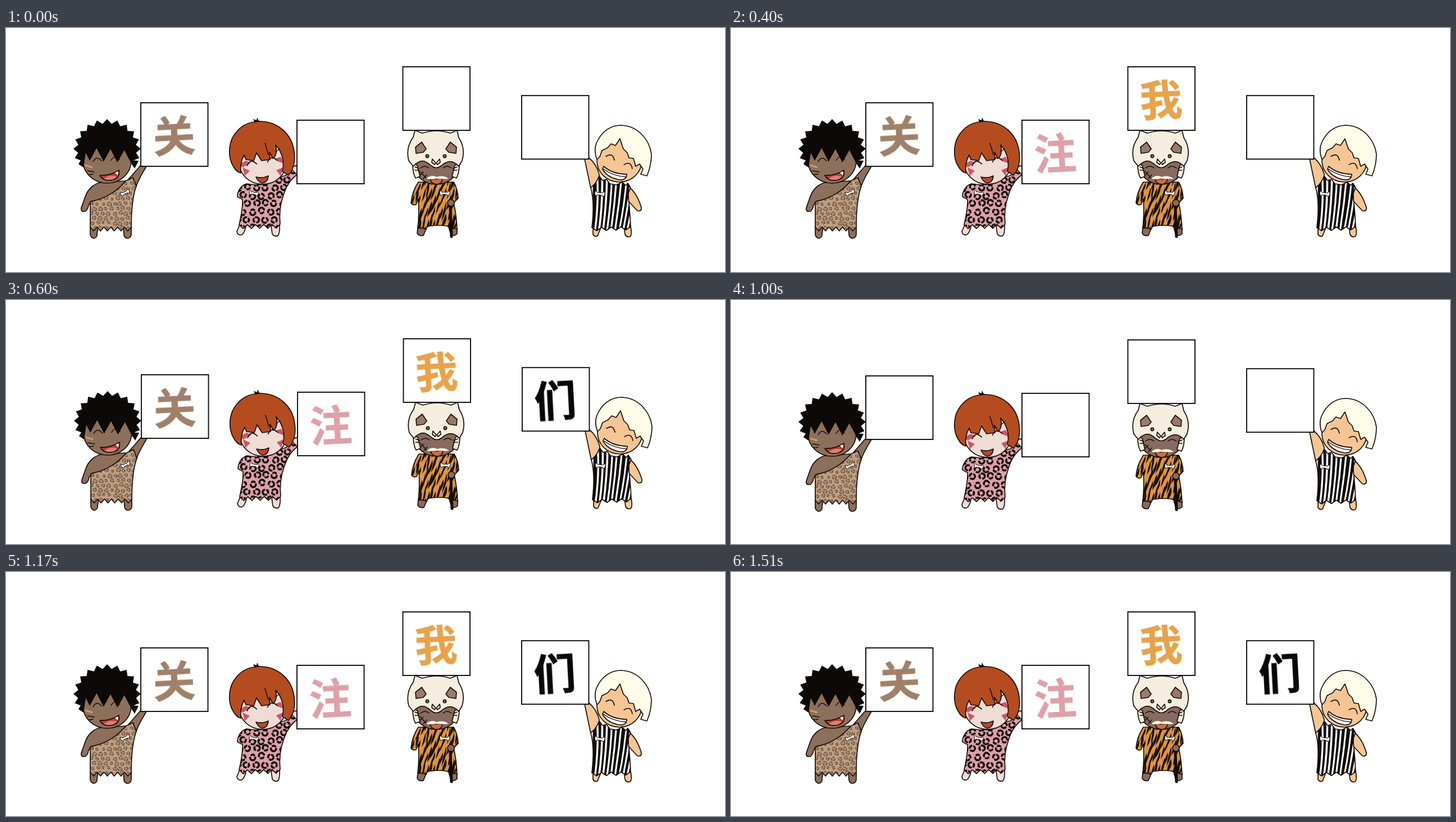
Write an HTML page that moves like this. It is 1280 px wide and 434 px high and loops after 1680 ms.

```html
<!DOCTYPE html>
<html lang="zh-CN">
<head>
<meta charset="utf-8">
<title>关注我们</title>
<style>
html, body { margin: 0; width: 100%; height: 100%; overflow: hidden; background: #fff; }
svg { display: block; width: 100%; height: 100%; }
.line { stroke: #1a0d08; stroke-width: 1.7; stroke-linejoin: round; stroke-linecap: round; }
.thin { fill: none; stroke: #1a0d08; stroke-width: 1.5; stroke-linecap: round; stroke-linejoin: round; }
.card { fill: #fff; stroke: #0c0c0c; stroke-width: 1.9; }
.sign {
  font: 700 75px "Noto Sans CJK SC", "Noto Sans CJK", sans-serif;
  text-anchor: middle; stroke-width: .8; stroke-linejoin: round;
  animation: 1680ms step-end infinite;
}
#stage { animation: drift 1680ms step-end infinite; }
#words { animation: blink 1680ms step-end infinite; }
@keyframes drift {
  0% { transform: translate(0, 0); }
  35.7143% { transform: translate(1px, 0); }
  47.619% { transform: translate(1px, 1px); }
  59.5238%, 100% { transform: translate(0, 2px); }
}
@keyframes blink {
  0%, 69.6429%, 89.881%, 100% { opacity: 1; }
  59.5238%, 79.7619% { opacity: 0; }
}
@keyframes second { 0% { opacity: 0; } 11.9048%, 100% { opacity: 1; } }
@keyframes third { 0% { opacity: 0; } 23.8095%, 100% { opacity: 1; } }
@keyframes fourth { 0% { opacity: 0; } 35.7143%, 100% { opacity: 1; } }
</style>
</head>
<body>
<svg viewBox="0 0 1280 434">
<defs>
  <g id="bone" fill="none" stroke-linecap="round">
    <path d="M-7-2L-6 2M7-2L6 2M-7 0H7" stroke="#1a0d08" stroke-width="5"/>
    <path d="M-7-2L-6 2M7-2L6 2M-7 0H7" stroke="#fff" stroke-width="3"/>
  </g>
  <g id="flap">
    <path class="line" fill="#f5eee0" d="M724 242Q724 258 729 267L737 264L732 244Z"/>
  </g>
  <g id="half" class="line" fill="#9a7b6b">
    <path d="M740 203L748 215L743 221L730 223L729 212Z"/>
    <circle cx="750" cy="228" r="2.6"/>
    <path fill="#f5eee0" d="M759 233L765 240L763 243L758 239Z"/>
    <path class="thin" d="M738 249Q746 243 753 249M728 247L735 250M728 253L735 253"/>
  </g>
  <path id="eyes" class="thin" d="M-23 2Q-16-9-8 2M9 2Q16-9 24 2"/>
</defs>
<g id="stage">

  <!-- spiky black hair -->
  <g fill="#8d705b">
    <path class="line" d="M150 353V368Q152 374 157 374Q163 372 162 366L164 354ZM209 354L210 368Q211 374 217 374Q223 373 223 366V354Z"/>
    <path class="line" d="M212 276L240 244L250 246C242 260 235 270 231 284L218 292Z"/>
    <path class="line" d="M172 274C157 276 146 286 141 300L134 320Q133 328 141 326Q146 323 147 315L152 308C178 304 199 289 213 272Z"/>
    <g id="leopard"></g>
    <ellipse class="line" cx="180" cy="236" rx="43" ry="40"/>
  </g>
  <path id="spikes" fill="#0d0906"/>
  <use href="#eyes" transform="translate(178 234) rotate(-4)"/>
  <path class="thin" d="M145 254L157 256M147 261L155 260"/>
  <path d="M141 244L154 248" stroke="#c89a76" stroke-width="3"/>
  <path class="line" fill="#b8402c" d="M167 262Q185 263 201 253Q204 268 187 271Q172 272 167 262Z"/>
  <path fill="#dc7d7d" d="M174 268Q184 260 197 264Q192 270 186 270Q179 271 174 268Z"/>
  <path fill="#fff" d="M194 257L200 255L199 262Z"/>
  <use href="#bone" transform="translate(212 293) rotate(-25) scale(.9)"/>

  <!-- red bob -->
  <g fill="#eedcd5">
    <path class="line" d="M416 350L411 362Q412 369 419 368Q424 366 427 354ZM472 352L474 366Q477 371 483 370Q488 367 487 349Z"/>
    <path class="line" d="M507 252Q510 244 519 245V261L511 259Z"/>
    <g id="spots"></g>
    <ellipse class="line" cx="457" cy="239" rx="42" ry="39"/>
  </g>
  <path fill="#c95766" d="M416 242L427 236L436 240L421 248ZM478 233L489 229L495 241L483 237ZM421 248L434 254L425 263ZM481 253L493 248L489 263Z"/>
  <path class="line" fill="#b44c20" d="M418 258Q410 256 404 245C395 230 396 207 405 192C416 174 433 166 453 166C485 167 509 189 513 220C516 240 511 252 503 262L492 255Q497 236 487 217L480 208Q484 226 475 232L469 221L470 234L455 236L446 222L441 236L427 234L424 226Q416 240 418 258Z"/>
  <path fill="#1a0d08" d="M443 168L440 162L446 164L447 159L450 165L453 166Z"/>
  <path class="thin" d="M461 205L467 225M480 220L487 215"/>
  <use href="#eyes" transform="translate(455 238) rotate(-10) scale(1.15)"/>
  <path class="line" fill="#b74732" d="M445 265Q457 268 467 263Q466 275 456 276Q449 274 445 265Z"/>
  <use href="#bone" transform="translate(441 294) rotate(12) scale(.9)"/>

  <!-- skull helmet -->
  <g fill="#866b5e">
    <path class="line" d="M733 355L732 365Q736 371 743 369L748 357ZM789 357L792 368Q798 371 803 366V356Z"/>
    <g id="tiger"></g>
    <path d="M791 318L793 371" stroke="#100a06" stroke-width="5" stroke-linecap="round"/>
    <circle class="line" cx="792" cy="311" r="6"/>
    <ellipse class="line" cx="766" cy="247" rx="38" ry="31"/>
  </g>
  <use href="#flap"/>
  <use href="#flap" transform="translate(1531) scale(-1 1)"/>
  <path class="line" fill="#f5eee0" d="M725 194L728 182L741 187Q767 179 791 187L803 182L806 195C814 207 816 222 812 236L806 246Q797 236 787 238Q780 240 775 245Q766 252 757 245Q752 240 745 237Q735 235 725 246L717 236Q711 213 725 194Z"/>
  <use href="#half"/>
  <use href="#half" transform="translate(1531) scale(-1 1)"/>
  <path class="thin" d="M737 255L748 267M737 262L743 256M743 268L749 261"/>
  <path class="line" fill="#d26b34" d="M755 269L777 268Q776 278 766 278Q757 277 755 269Z"/>
  <path fill="#fff4e4" d="M748 268Q757 260 767 265Q778 261 788 268Q776 269 766 268Q757 270 748 268Z"/>
  <use href="#bone" transform="translate(781 294) rotate(2)"/>

  <!-- pale hair -->
  <g fill="#f5c694">
    <path class="line" d="M1045 354V367Q1048 372 1053 370L1059 355ZM1100 353L1102 367Q1105 373 1111 371Q1115 368 1112 353Z"/>
    <path class="line" d="M1029 228L1041 285L1056 276V260Q1051 242 1038 231Z"/>
    <path class="line" d="M1108 282Q1123 293 1131 319Q1132 327 1124 325L1108 308Z"/>
    <g id="zebra"></g>
    <ellipse class="line" cx="1092" cy="236" rx="40" ry="38"/>
  </g>
  <path class="line" fill="#fffdea" d="M1052 234Q1046 218 1051 205C1060 184 1076 173 1095 173C1124 174 1145 197 1149 224Q1149 245 1141 263L1130 260L1134 251L1128 242L1121 246L1117 232L1109 231L1106 222L1099 215L1093 197L1085 209L1077 206L1071 213L1061 218L1057 229Z"/>
  <use href="#eyes" transform="translate(1092 237) rotate(25) scale(1.1)"/>
  <path class="line" fill="#fff" d="M1064 246Q1080 260 1105 260Q1105 271 1092 270Q1070 266 1062 251Z"/>
  <path class="thin" stroke-width="1" d="M1064 251Q1080 263 1104 265"/>
  <use href="#bone" transform="translate(1057 295) rotate(6)"/>

  <g id="cards"></g>
  <g id="words"></g>
</g>
</svg>
<script>
const NS = "http://www.w3.org/2000/svg";
const byId = id => document.getElementById(id);

function add(parent, tag, attrs) {
  const node = document.createElementNS(NS, tag);
  for (const key in attrs) node.setAttribute(key, attrs[key]);
  return parent.appendChild(node);
}

let seed = 7;
const rand = (a, b) => {
  seed = (seed * 16807) % 2147483647;
  return a + (b - a) * seed / 2147483647;
};

// Zigzag of n teeth; when it runs leftwards a positive depth points down.
function zigzag(x1, y1, x2, y2, n, depth) {
  let d = `L${x1} ${y1}`;
  for (let i = 1; i <= n; i++) {
    const mid = (i - 0.5) / n, end = i / n;
    d += `L${x1 + (x2 - x1) * mid} ${y1 + (y2 - y1) * mid + depth}`;
    d += `L${x1 + (x2 - x1) * end} ${y1 + (y2 - y1) * end}`;
  }
  return d;
}

// Pointed tufts around an ellipse, clockwise from the lower left.
function crown(cx, cy, rx, ry, n, depth) {
  const points = [];
  for (let i = 0; i <= 2 * n; i++) {
    const a = Math.PI * (0.86 + 1.28 * i / (2 * n)), out = i % 2 * depth;
    points.push(`${cx + (rx + out) * Math.cos(a)} ${cy + (ry + out) * Math.sin(a)}`);
  }
  return "L" + points.join("L");
}

byId("spikes").setAttribute("d",
  "M138 248L129 242" + crown(180, 216, 52, 46, 13, 8) + "L236 236L229 250" +
  zigzag(223, 241, 149, 236, 3, -23) + "L142 222Z");

// Leaf-shaped stripe bending through its middle.
const stripe = (x, y, lean, len, w) =>
  `M${x} ${y}Q${x + lean * 0.2 + w} ${y + len / 2} ${x + lean} ${y + len}Q${x + lean * 0.2 - w} ${y + len / 2} ${x} ${y}Z`;

function scatter(x0, x1, y0, y1, step, draw) {
  let row = 0;
  for (let y = y0; y < y1; y += step * 0.88, row++)
    for (let x = x0 + row % 2 * step / 2; x < x1; x += step)
      draw(x + rand(-1.5, 1.5), y + rand(-1.5, 1.5));
}

function dress(id, fill, outline, weave) {
  const g = byId(id);
  const clip = add(g, "clipPath", { id: id + "-cut" });
  add(clip, "path", { d: outline });
  add(g, "path", { d: outline, fill });
  weave(add(g, "g", { "clip-path": `url(#${id}-cut)` }));
  add(g, "path", { d: outline, class: "line", fill: "none" });
}

dress("leopard", "#bda083",
  "M150 309C176 304 199 290 213 272L226 266L232 281C227 295 223 320 223 355" +
  zigzag(223, 354, 150, 354, 6, 7) + "Z",
  g => scatter(148, 236, 268, 364, 10, (x, y) => add(g, "circle", {
    cx: x, cy: y, r: rand(2, 3.6), fill: "#a88970", stroke: "#6a4d3b",
    "stroke-width": 1.4, "stroke-dasharray": "5 1.5" })));

dress("spots", "#dd9fa8",
  "M428 277C418 280 412 290 412 300L421 305C422 320 418 336 415 350" +
  "L488 350C486 330 488 314 494 297C499 281 508 268 518 261L508 251C503 262 494 266 484 263L465 278L445 279Z"
    .replace("L488 350", zigzag(415, 350, 488, 349, 5, 7)),
  g => scatter(414, 520, 256, 362, 16, (x, y) => add(g, "path", {
    d: "M-4 2A4.5 4.5 0 0 1 3-4M4 1Q3 4 0 4", fill: "none", stroke: "#120b0a",
    "stroke-width": 3.6, "stroke-linecap": "round",
    transform: `translate(${x} ${y}) rotate(${rand(0, 360)})` })));

dress("tiger", "#e0953c",
  "M734 274C727 285 722 299 721 311Q724 316 730 314L734 304Q736 330 733 356" +
  "Q740 354 748 358Q749 352 757 352Q770 350 784 352Q789 353 789 358Q797 354 803 358" +
  "Q802 333 797 311L805 303Q804 286 797 274Z",
  g => scatter(722, 816, 250, 360, 13, (x, y) => add(g, "path", {
    d: stripe(x + 4, y, rand(-11, -4), rand(22, 36), rand(3, 5)), fill: "#17100a" })));

dress("zebra", "#110d0b",
  "M1056 263L1062 271L1069 269L1075 277L1087 279L1097 274L1103 280L1107 276L1112 284" +
  "L1107 296C1110 315 1111 332 1112 354" + zigzag(1112, 353, 1043, 355, 4, 6) +
  "C1046 330 1047 306 1041 284C1049 278 1053 271 1056 263Z",
  g => {
    for (let x = 1034; x < 1136; x += 8) {
      const lean = (x - 1030) / 9;
      add(g, "path", { d: `M${x + lean} 258Q${x + rand(2, 6)} 312 ${x - lean} 366`,
        fill: "none", stroke: "#fff", "stroke-width": rand(2.4, 3.8) });
    }
  });

function sign(x, y, char, color, reveal) {
  add(byId("cards"), "rect", { x, y, width: 119.5, height: 113, class: "card" });
  const text = add(byId("words"), "text", { x: x + 59, y: y + 87, class: "sign", fill: color,
    stroke: color, transform: `rotate(-3 ${x + 59} ${y + 59})` });
  text.textContent = char;
  text.style.animationName = reveal;
}

sign(240, 133, "关", "#a08069", "none");
sign(518, 164, "注", "#dfa0a8", "second");
sign(706.5, 69, "我", "#e8a24a", "third");
sign(918, 120.2, "们", "#080606", "fourth");
</script>
</body>
</html>
```
